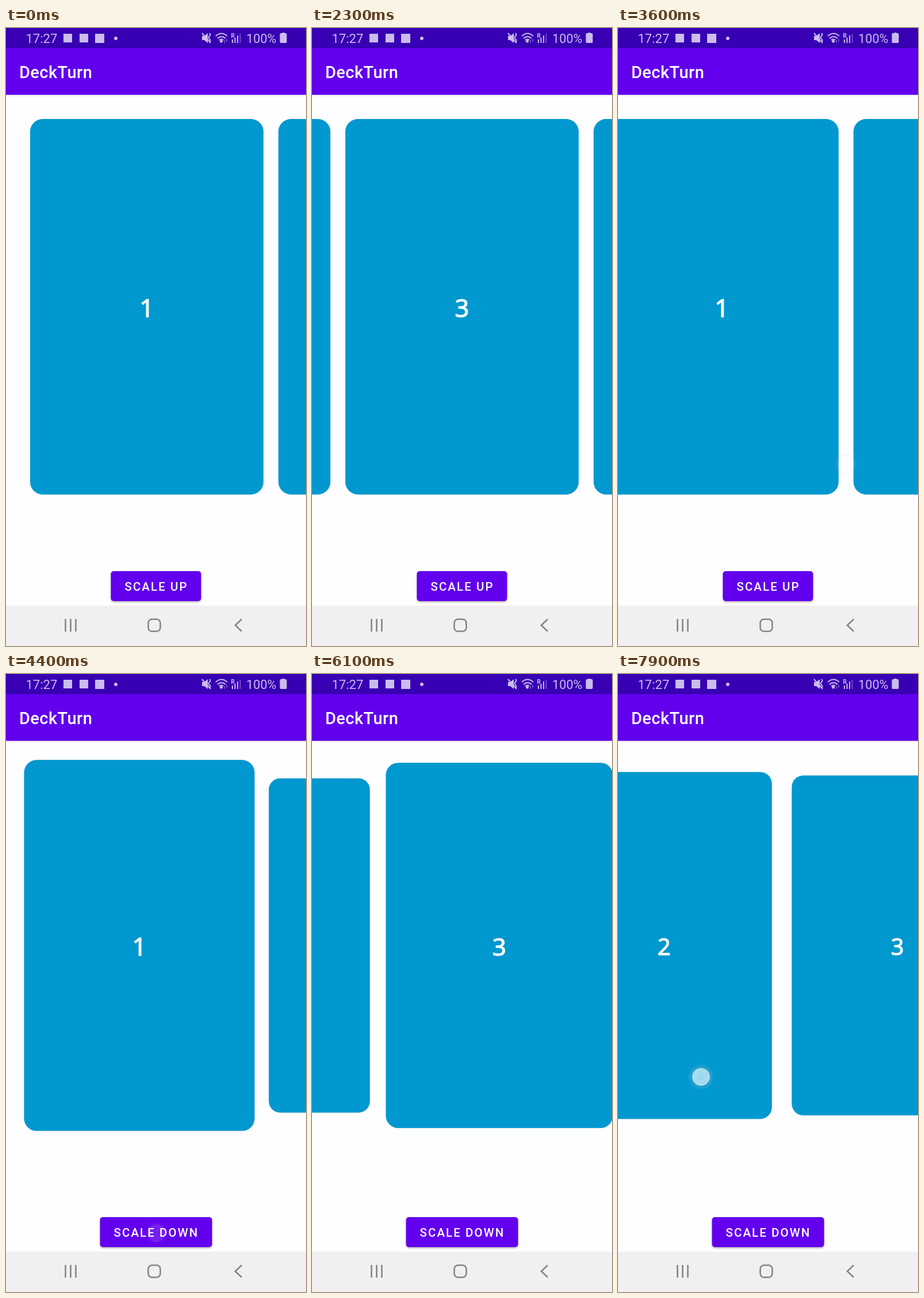
An HTML page for the animation above (8 s loop, 522 px wide and 1073 px high).

```html
<!DOCTYPE html>
<html lang="en">
<head>
<meta charset="utf-8">
<title>Card carousel</title>
<style>
  html, body { margin: 0; width: 100%; height: 100%; overflow: hidden; }
  #stage { position: relative; width: 522px; height: 1073px; overflow: hidden; background: #fefdff; }
  #stage > * { position: absolute; }
  .card {
    left: -203px; top: 158px; width: 406px; height: 652px; border-radius: 22px;
    background: #0098cf; box-shadow: 0 0 1px rgba(0, 0, 0, .2);
    color: #fff; font: 400 43.5px/654px "Noto Sans", "Open Sans", sans-serif; text-align: center;
    -webkit-text-stroke: 1.2px #fff;
  }
  #bar { left: 0; top: 0; width: 522px; height: 116px; background: #6200ee; box-shadow: 0 1px 3px rgba(0, 0, 0, .15); }
  #button {
    left: 261px; top: 942.5px; height: 52px; padding: 0 23px 0 24px; transform: translateX(-50%);
    border-radius: 5px; background: #6200ee; box-shadow: 0 2px 3px rgba(0, 0, 0, .3);
    color: #fff; font: 500 20.5px/54px Roboto, sans-serif; letter-spacing: 2.05px; white-space: nowrap;
  }
  svg { left: 0; top: 0; font-family: Roboto, sans-serif; }
  #dot {
    left: -15.5px; top: -15.5px; width: 31px; height: 31px; border-radius: 50%;
    background: radial-gradient(rgba(255, 255, 255, .6), rgba(255, 255, 255, .7));
    box-shadow: 0 0 2px 1px rgba(0, 60, 90, .3), 0 0 6px 3px rgba(255, 255, 255, .25);
  }
</style>
</head>
<body>
<div id="stage">
  <div class="card">1</div>
  <div class="card">2</div>
  <div class="card">3</div>
  <div class="card">4</div>
  <div id="bar"></div>
  <div id="button">SCALE UP</div>
  <svg width="522" height="1073">
    <rect width="522" height="35" fill="#3700b3"/>
    <text x="23" y="87" font-size="29" font-weight="500" letter-spacing=".4" fill="#fff">DeckTurn</text>
    <g fill="#cbbcee">
      <text x="34.5" y="25.5" font-size="22">17:27</text>
      <text x="418" y="25.5" font-size="21.7">100%</text>
      <rect x="100" y="10" width="15" height="15"/>
      <rect x="128" y="10" width="15" height="15"/>
      <rect x="155" y="10" width="16" height="16"/>
      <circle cx="191" cy="18" r="3"/>
      <path d="M341 14h4l6-5v17l-6-5h-4z"/>
      <path d="M478.5 9h2v-1h4v1h2q2 0 2 2v13q0 2-2 2h-8q-2 0-2-2v-13q0-2 2-2z"/>
      <text x="391.5" y="17" font-size="10" font-weight="700">R</text>
      <circle cx="374.5" cy="23" r="2.5"/>
    </g>
    <g fill="none" stroke="#cbbcee" stroke-width="2">
      <path d="M341 9l15 17M354 9q3 2 0 5t0 5t0 6"/>
      <path d="M365 14q10-9 20 0M368 18q7-6 14 0M371 21q4-3 7 0"/>
      <path d="M394 20v6M398.5 17v9M403 13v13"/>
      <path d="M407.5 10v16M380 21v5M384 19v5" opacity=".4"/>
    </g>
    <rect y="1003" width="522" height="70" fill="#f1eff2"/>
    <g fill="none" stroke="#858487" stroke-width="2.6">
      <path d="M103.5 1026v22M112.5 1026v22M121.5 1026v22M410 1026.5l-11 10.5 11 10.5"/>
      <rect x="247.5" y="1026.5" width="21" height="21" rx="6.5"/>
    </g>
  </svg>
  <div id="dot"></div>
</div>
<script>
const LOOP = 8000, STEP = 100, FADE = 250, SCALE_AT = 4300, MIDDLE = 261, SLOP = .1;
const plain = { label: 'SCALE UP', first: 245, pitch: 432, shift: 0, shrink: 0 };
const scaled = { label: 'SCALE DOWN', first: 232, pitch: 406, shift: -12.7, shrink: .11 };

const layoutAt = t => t < SCALE_AT ? plain : scaled;
const stop = (layout, page) => Math.max(0, layout.first + layout.pitch * page - MIDDLE);
const clamp = v => Math.max(0, Math.min(1, v));
const mix = (a, b, p) => a + (b - a) * p;
const ease = u => u * u * u * (10 + u * (6 * u - 15));

// A swipe settles at `end`; the finger stays down for `hold` and lifts at (x, y).
function swipe(from, to, end, { span = 655, hold = 260, x, y = 716 } = {}) {
  const start = end - span, layout = layoutAt(start), forward = to > from;
  x ??= forward ? 157 : 365;
  return {
    start, span, hold, x, y,
    x0: x + (forward ? 220 : -270), y0: y + (forward ? 20 : -12),
    scroll: u => mix(stop(layout, from), stop(layout, to), u < SLOP ? 0 : ease(u)),
  };
}

const swipes = [
  swipe(0, 1, 1500),
  swipe(1, 2, 2300, { span: 600 }),
  swipe(2, 1, 3250, { span: 450, y: 757 }),
  swipe(1, 0, 3732, { span: 450, hold: 130, x: 396, y: 757 }),
  swipe(0, 1, 5301),
  swipe(1, 2, 6295, { hold: 200 }),
  swipe(2, 1, 7335, { hold: 345, x: 438, y: 729 }),
  swipe(1, 2, 8371, { span: 890, hold: 419, x: 144, y: 699 }),
];
const tap = { start: 4100, hold: 100, x: 261, y: 970, x0: 261, y0: 970 };
const touches = [...swipes, tap].sort((a, b) => a.start - b.start);

const cards = [...document.querySelectorAll('.card')];
const button = document.getElementById('button');
const dot = document.getElementById('dot');
const latest = (list, t) => list.findLast(g => t >= g.start);

function drawCards(t) {
  const { first, pitch, shift, shrink, label } = layoutAt(t);
  const s = latest(swipes, t);
  const scroll = s ? s.scroll(clamp((t - s.start) / s.span)) : 0;
  cards.forEach((card, i) => {
    const x = first + pitch * i - scroll;
    const size = 1 - shrink * clamp(Math.abs(x - MIDDLE) / MIDDLE);
    card.style.transform = `translate(${x}px, ${shift}px) scale(${size})`;
  });
  button.textContent = label;
}

function drawDot(t) {
  const g = latest(touches, t);
  dot.style.opacity = g ? clamp(1 - (t - g.start - g.hold) / FADE) : 0;
  if (!g) return;
  const p = clamp((t - g.start) / g.hold) ** 1.4;
  dot.style.transform = `translate(${mix(g.x0, g.x, p)}px, ${mix(g.y0, g.y, p)}px)`;
}

function draw(now) {
  const t = Math.floor(now % LOOP / STEP) * STEP;
  drawCards(t);
  drawDot(t);
  requestAnimationFrame(draw);
}
requestAnimationFrame(draw);
</script>
</body>
</html>
```
